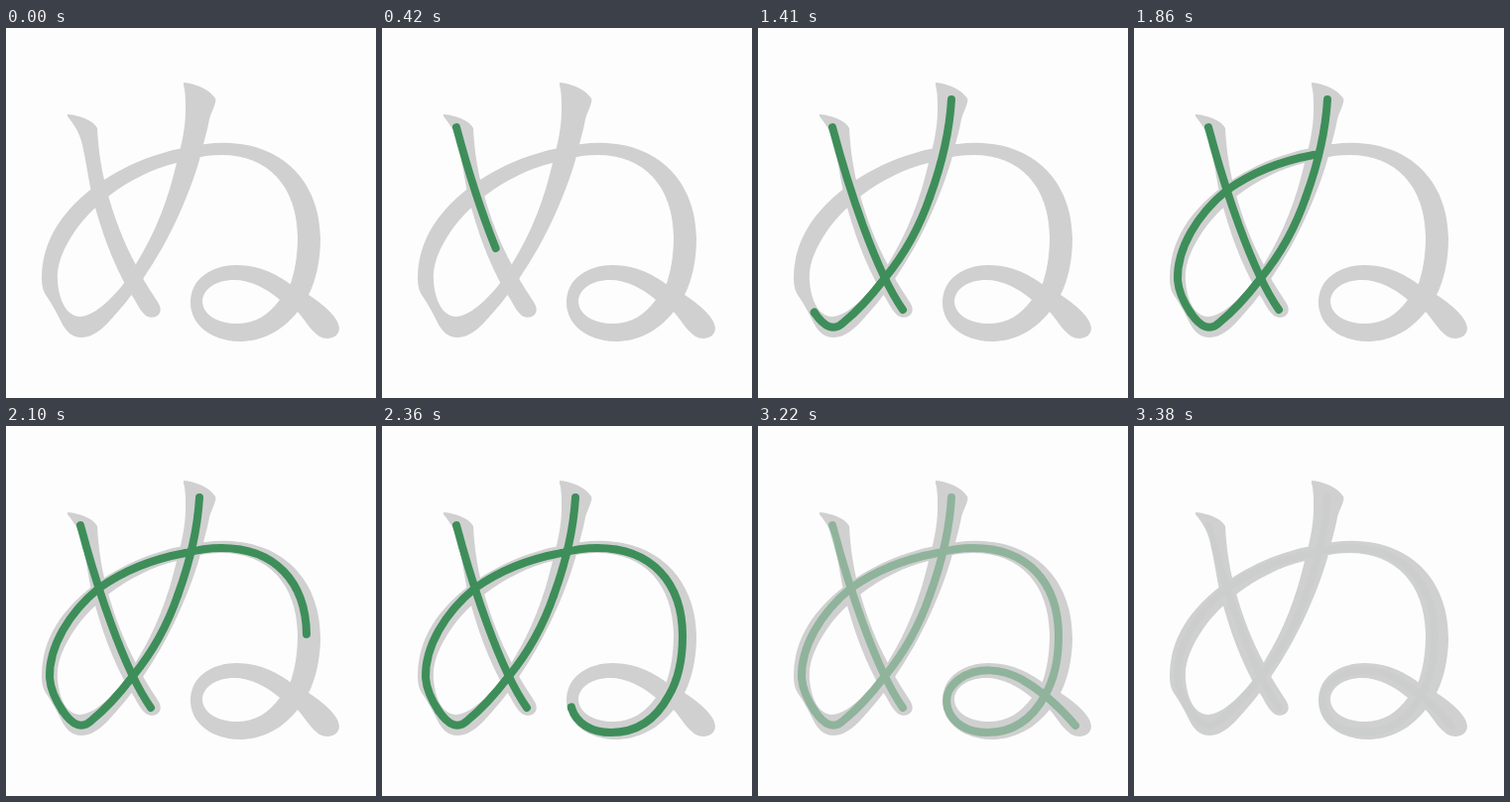
An HTML page for the animation above (3.47 s loop, 373 by 373 pixels).

```html
<!DOCTYPE html>
<html lang="ja">
<head>
<meta charset="utf-8">
<title>Stroke order</title>
<style>
  html, body { margin: 0; width: 100%; height: 100%; overflow: hidden; background: #fdfdfd; }
  svg { display: block; width: 100vw; height: 100vh; }
  #glyph { fill: #d0d0d0; }
  #ink { fill: none; stroke: #3e8e5a; stroke-width: 8; stroke-linecap: round; stroke-linejoin: round; }
</style>
</head>
<body>
<svg viewBox="0 0 373 373">
  <g id="glyph">
    <path d="M62 87 C75 88 89 94 92 101 C93 122 96 143 102 165 C109 191 119 217 131 239
      C138 254 146 265 154 278 C160 289 149 295 141 290 C133 283 131 274 125 267
      C108 238 96 205 87 170 C83 153 81 135 77 118 C74 105 69 98 62 89Z"/>
    <path d="M179 55 C192 56 205 62 211 71 C213 75 207 84 205 92 C203 104 200 112 198 122
      C187 165 165 214 138 253 C126 271 114 285 102 298 C92 308 84 312 76 312
      C67 312 61 306 57 299 C52 289 47 279 40 269 C37 264 36 259 36 251 C36 228 45 204 63 184
      C94 149 139 128 183 120 C198 117 212 115 226 116 C284 119 317 160 317 213
      C317 235 312 256 305 269 C319 278 336 292 336 303 C335 313 324 315 316 311
      C306 304 303 296 294 286 C278 306 258 316 235 316 C205 315 186 298 186 277
      C186 252 208 239 233 239 C256 239 275 249 290 261 L305 269 L294 286 L276 274
      C262 262 246 254 230 254 C211 254 198 264 198 276 C199 290 214 298 234 298
      C251 298 265 289 276 274 L286 260 C291 247 294 230 294 210
      C293 160 265 128 217 128 C202 128 188 131 172 136 C147 142 124 154 104 169
      C85 184 71 200 62 217 C55 230 51 242 52 255 C53 270 59 290 74 291
      C88 291 106 274 120 256 C124 250 128 244 131 238 C151 206 164 171 172 136
      C177 118 181 100 181 83 C181 72 181 64 179 58Z"/>
  </g>
  <g id="ink"></g>
</svg>
<script>
  const LOOP = 3470;
  const FADE = [3005, 3388];

  // start ms, end ms, easing power, centre line
  const strokes = [
    [70, 560, 1.3, 'M75 100 C91 160 118 244 146 284'],
    [565, 1000, 1.6, 'M195 72 C193 106 184 141 173 171'],
    [1000, 1410, 1, 'M173 171 C162 203 146 230 128 252 C115 269 101 285 86 297 C77 306 67 302 57 287'],
    [1410, 1860, 1, 'M57 287 C51 278 45 266 44 254 C43 222 64 188 93 164 C118 146 148 134 181 128'],
    [1860, 2360, 1, 'M181 128 C192 125 205 123 217 123 C272 123 303 158 303 212 C303 235 299 255 289 272 C276 296 256 309 231 309 C211 309 196 300 191 284'],
    [2360, 2615, 1, 'M191 284 C188 270 194 262 203 255 C222 242 246 245 265 255 C288 268 304 283 320 302']
  ];

  const ink = document.getElementById('ink');
  const clamp = v => Math.min(1, Math.max(0, v));
  const progress = (t, from, to) => clamp((t - from) / (to - from));

  const paths = strokes.map(([, , , d]) => {
    const path = document.createElementNS('http://www.w3.org/2000/svg', 'path');
    path.setAttribute('d', d);
    path.setAttribute('pathLength', 1);
    ink.append(path);
    return path;
  });

  function draw(t) {
    strokes.forEach(([from, to, power], i) => {
      const p = progress(t, from, to) ** power;
      paths[i].style.visibility = p > 0 ? 'visible' : 'hidden';
      paths[i].setAttribute('stroke-dasharray', p < 1 ? `${p} 2` : 'none');
    });
    ink.style.opacity = 1 - progress(t, ...FADE);
  }

  const start = performance.now();
  function tick() {
    draw((performance.now() - start) % LOOP);
    requestAnimationFrame(tick);
  }
  tick();
</script>
</body>
</html>
```
